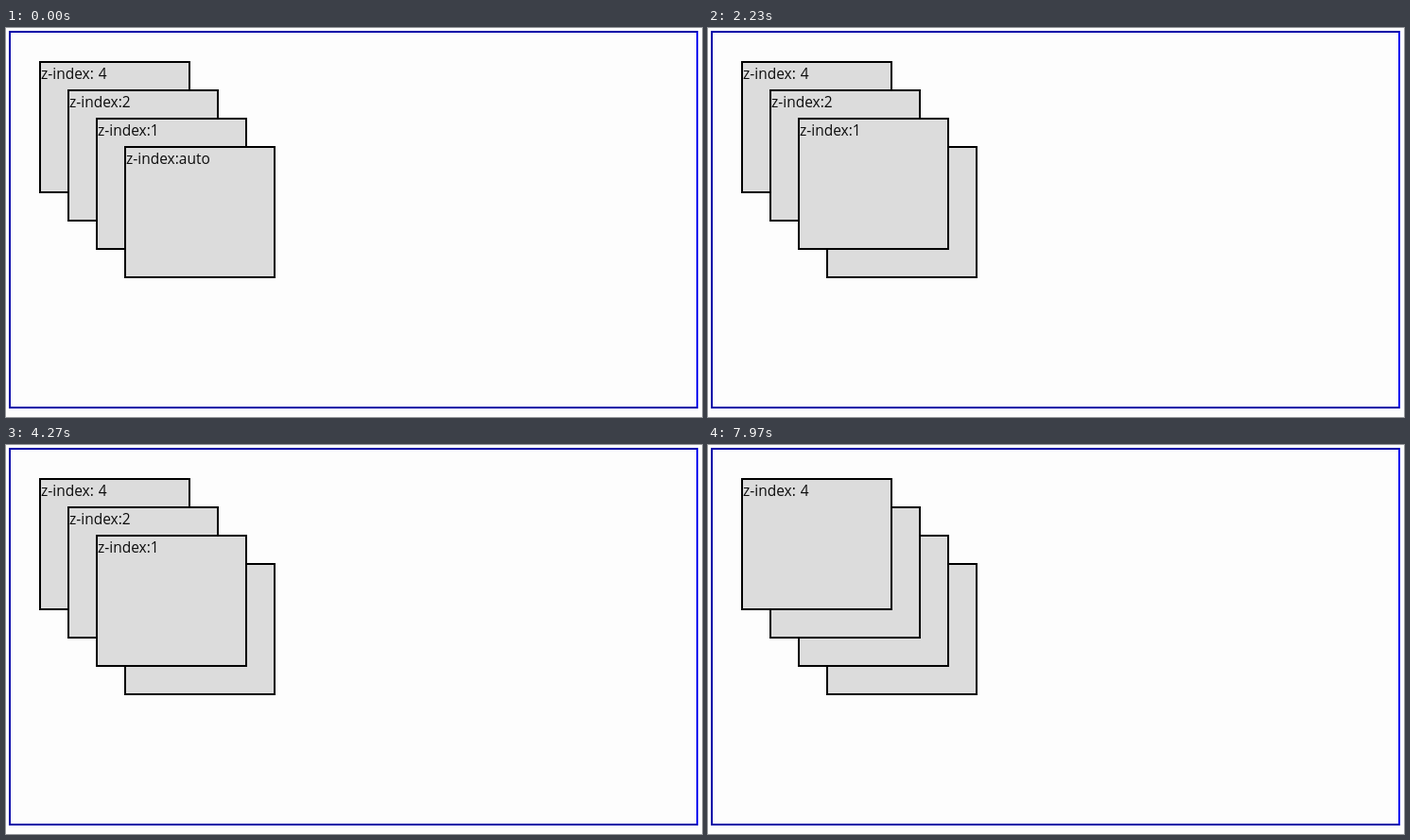
An HTML page for the animation above (8000 ms loop, 736 px wide and 412 px high).

```html
<!DOCTYPE html>
<html lang="en">
<head>
<meta charset="utf-8">
<title>z-index stacking</title>
<style>
  html, body {
    margin: 0;
    width: 100%;
    height: 100%;
    overflow: hidden;
    background: #fdfdfd;
  }
  body {
    position: relative;
    font: 15.5px/21px "Open Sans", "Noto Sans", sans-serif;
    word-spacing: 1px;
    color: #0c0c0c;
  }
  .frame {
    position: absolute;
    left: 3px;
    top: 3px;
    width: 729px;
    height: 400px;
    box-sizing: border-box;
    border: 2px solid #0000a8;
    border-right-color: #0000f0;
    isolation: isolate;
  }
  .box {
    position: absolute;
    left: calc(30px * var(--n));
    top: calc(30px * var(--n));
    width: 160px;
    height: 140px;
    box-sizing: border-box;
    padding-top: 1px;
    border: 2px solid #000;
    background: #dcdcdc;
    z-index: 0;
    animation: 8s step-end infinite;
  }
  .a { --n: 1; animation-name: raise-a; }
  .b { --n: 2; animation-name: raise-b; }
  .c { --n: 3; animation-name: raise-c; }
  .d { --n: 4; }

  /* the bare page shown for a moment while it reloads */
  .plain {
    position: absolute;
    inset: 0;
    padding: 4px 3px;
    background: #fdfdfd;
    visibility: hidden;
    animation: reload 8s step-end infinite;
  }

  @keyframes raise-c { 0% { z-index: 0 } 24.625%, 100% { z-index: 1 } }
  @keyframes raise-b { 0% { z-index: 0 } 61.625%, 100% { z-index: 2 } }
  @keyframes raise-a { 0% { z-index: 0 } 98.375%, 100% { z-index: 4 } }
  @keyframes reload {
    0% { visibility: hidden }
    98.375% { visibility: visible }
    99.125%, 100% { visibility: hidden }
  }
</style>
</head>
<body>
  <div class="frame">
    <div class="box a">z-index: 4</div>
    <div class="box b">z-index:2</div>
    <div class="box c">z-index:1</div>
    <div class="box d">z-index:auto</div>
  </div>
  <div class="plain">
    <div>z-index: 4</div>
    <div>z-index:2</div>
    <div>z-index:1</div>
    <div>z-index:auto</div>
  </div>
</body>
</html>
```
